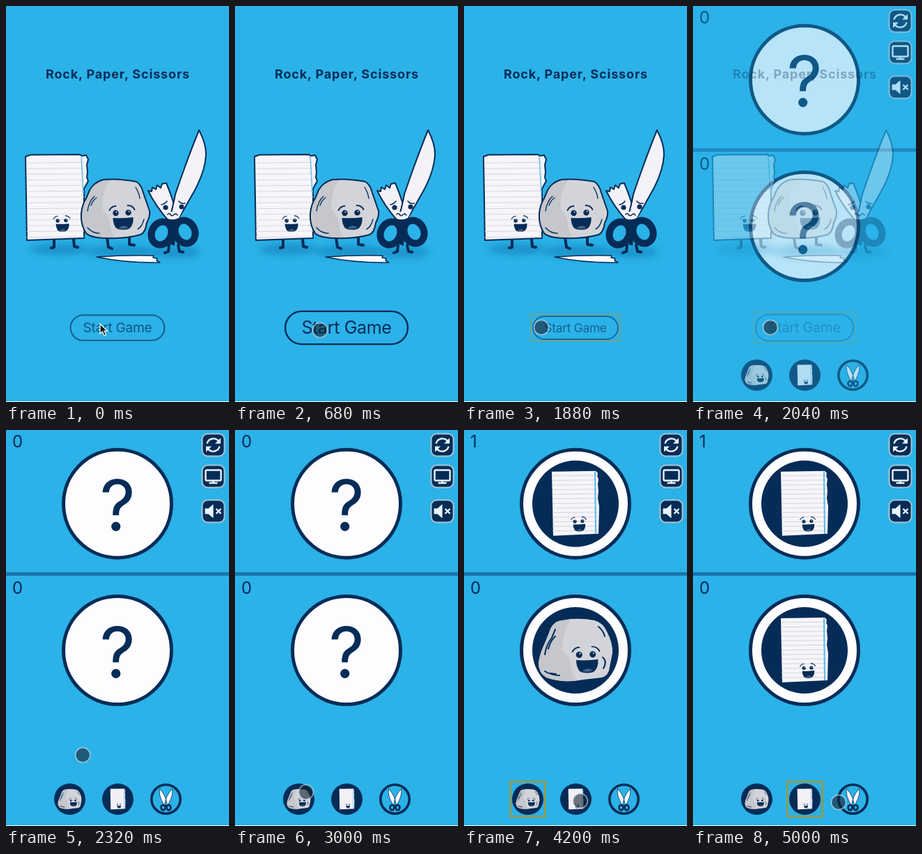
An HTML page that plays this animation: 320 by 568 pixels, repeating every 5.04 s.

```html
<!DOCTYPE html>
<html lang="en">
<head>
<meta charset="utf-8">
<title>Rock, Paper, Scissors</title>
<style>
html, body { margin: 0; width: 100%; height: 100%; overflow: hidden; background: #2bb2e8; }
svg { display: block; width: 100%; height: 100%; cursor: default; }
text { font-family: Inter, "Open Sans", sans-serif; fill: #052c57; }
.line { fill: none; stroke: #052c57; stroke-linecap: round; stroke-linejoin: round; }
.ink { fill: #052c57; }
.icon { fill: none; stroke: #e9f3f9; stroke-width: 2.4; stroke-linejoin: round; }
</style>
</head>
<body>
<svg viewBox="0 0 320 568">
  <defs>
    <filter id="soft" x="-20%" y="-100%" width="140%" height="300%"><feGaussianBlur stdDeviation="5"/></filter>

    <g id="face">
      <circle class="ink" cx="-9" r="4.2"/><circle class="ink" cx="9" cy="-.6" r="4.2"/>
      <circle cx="-8" cy="-1.6" r=".9" fill="#fff"/><circle cx="10" cy="-2.2" r=".9" fill="#fff"/>
      <path class="line" stroke-width="1.8" d="M-18-4Q-15-10-9-10M8-11Q15-11 18-5"/>
      <path class="ink" d="M-13 7Q2 8 16 6Q17 15 12 21Q9 24 2 24Q-6 24-9 21Q-13 15-13 7Z"/>
      <path d="M-5 21Q3 16 9 20.5Q6 22.5 2 22.5Q-3 22.5-5 21Z" fill="#45628a"/>
    </g>

    <g id="rock">
      <path fill="#d3d4da" d="M-53 18Q-51 4-45-8L-38-25Q-34-39-24-42L-6-45Q12-46 27-43Q39-40 45-27Q54-10 53 4L49 24Q48 36 38 39L12 42Q-18 48-42 39Q-53 33-53 18Z"/>
      <path fill="#c5c7cc" d="M-6-45Q-20-24-19 0Q-8 8-6 26Q-4 38 2 43Q-22 46-42 39Q-53 33-53 18Q-51 4-45-8L-38-25Q-34-39-24-42Z"/>
      <path class="line" stroke-width="2" d="M-44 6Q-42-8-34-18L-29-30M-39-2Q-36-14-29-20M39 10Q46 16 40 26M-44 30Q-34 36-23 36M33-34Q40-28 42-20M-36 33L-28 34"/>
      <use href="#face" transform="translate(15 6.5) scale(1.08)"/>
    </g>

    <g id="page">
      <path fill="#f7f5f9" d="M-34-46L29-47L32-44L31-40L33-35L32-28L33-18L32-8L34 4L33 43L-32 46Z"/>
      <path id="rules" fill="none" stroke="#d3d4de" stroke-width="1"/>
      <path fill="none" stroke="#58b9e6" stroke-width="2" d="M28-46L29 43"/>
      <use href="#face" transform="translate(4.5 25.5) scale(.6)"/>
    </g>

    <circle id="mark" r="77.5" fill="#fdfcff" stroke="#052c57" stroke-width="5"/>
    <g id="ask"><text y="38.5" font-size="100" text-anchor="middle">?</text></g>
    <g id="bigRock"><circle class="ink" r="62"/><use href="#rock"/></g>
    <g id="bigPage"><circle class="ink" r="62"/><use href="#page"/></g>
    <rect id="tile" x="-16" y="-16" width="32" height="32" rx="8" fill="#052c57" stroke="#a9c3d3" stroke-width="2"/>
    <path id="stone" d="M108 298Q109 285 115 276L120 264Q127 252 140 249Q162 247 187 252Q194 256 197 268L206 294Q207 301 202 311Q200 325 193 328Q172 334 145 333Q123 333 115 326Q107 314 108 298Z"/>
  </defs>

  <rect width="320" height="568" fill="#2bb2e8"/>

  <g id="game">
    <rect y="204" width="320" height="5" fill="#1a75ad"/>
    <text id="topScore" x="9" y="24.5" font-size="24">0</text>
    <text x="9" y="235" font-size="24">0</text>
    <g transform="translate(160 105.7)"><use href="#mark"/><use id="top"/></g>
    <g transform="translate(160 316)"><use href="#mark"/><use id="low"/></g>

    <g transform="translate(297.5 21.5)">
      <use href="#tile"/>
      <path class="icon" d="M-9-2A9.5 9.5 0 0 1 8-5M9 2A9.5 9.5 0 0 1-8 5"/>
      <path fill="#e9f3f9" d="M10.5-10V-2H2.5ZM-10.5 10V2H-2.5Z"/>
    </g>
    <g transform="translate(297.5 66.5)">
      <use href="#tile"/>
      <rect class="icon" x="-11" y="-9" width="22" height="15" rx="1.5"/>
      <path class="icon" d="M0 6V9M-6 9.5H6"/>
    </g>
    <g transform="translate(297.5 116.5)">
      <use href="#tile"/>
      <path fill="#e9f3f9" d="M-12-4H-7L0-10V10L-7 4H-12Z"/>
      <path class="icon" d="M4-3.5L11 3.5M11-3.5L4 3.5"/>
    </g>

    <g transform="translate(91.5 529.5)"><circle class="ink" r="22.5"/><use href="#rock" transform="scale(.32)"/></g>
    <g transform="translate(160.5 529.5)"><circle class="ink" r="22.5"/><use href="#page" transform="scale(.32)"/></g>
    <g transform="translate(229.5 529.5)">
      <circle r="20.7" fill="#2bb2e8" stroke="#052c57" stroke-width="3.6"/>
      <path fill="#fbfaff" stroke="#052c57" stroke-width=".8" d="M-9-15Q-11-6-3 8L2 10Q1-4-9-15ZM9-15Q11-6 3 8L-2 10Q-1-4 9-15Z"/>
      <ellipse class="line" stroke-width="2.6" cx="-4" cy="12" rx="3" ry="3.6"/>
      <ellipse class="line" stroke-width="2.6" cx="4" cy="12" rx="3" ry="3.6"/>
    </g>
    <rect id="focus" y="504.5" width="50" height="50" fill="none" stroke="#8f9a55" stroke-width="3"/>
  </g>

  <g id="menu">
    <text x="160.5" y="103.7" font-size="18" font-weight="700" letter-spacing=".85" text-anchor="middle">Rock, Paper, Scissors</text>
    <g fill="#1789c2" filter="url(#soft)" opacity=".75">
      <ellipse cx="76" cy="349" rx="42" ry="8"/>
      <ellipse cx="165" cy="352" rx="52" ry="9"/>
      <ellipse cx="243" cy="353" rx="36" ry="8"/>
    </g>
    <path class="line" stroke-width="4" d="M69 336V346L65 347M97 334L98 345L103 346M145 332L147 346L152 348M177 330V342L184 343M234 343L233 352L228 354M247 343L249 352L254 353"/>

    <path fill="#f6f5fa" stroke="#052c57" stroke-width="2" stroke-linejoin="round" d="M28 216L35 213.5L106 213L109 215L115 214L118 220L116 228L117 238L116 246L118 251L112 262V333L30 336Z"/>
    <path id="menuRules" fill="none" stroke="#dad9e3" stroke-width="1.1"/>
    <path fill="none" stroke="#6dc0e6" stroke-width="1.6" d="M108 215L111 270"/>
    <use href="#face" transform="translate(80 308) scale(.65)"/>

    <use href="#stone" fill="#d3d4da"/>
    <path fill="#c5c7cc" d="M150 248Q136 268 139 292Q150 304 150 318Q152 328 158 333Q123 334 115 326Q107 314 108 298Q109 285 115 276L120 264Q127 252 140 249Z"/>
    <use href="#stone" class="line" stroke-width="2"/>
    <path class="line" stroke-width="1.4" d="M117 294Q119 280 127 273M122 286Q125 278 130 275M117 318Q124 326 134 326M186 260Q191 268 192 276M198 306Q195 317 189 320"/>
    <use href="#face" transform="translate(166.5 297)"/>

    <path fill="#faf9fd" stroke="#052c57" stroke-width="1.5" stroke-linejoin="round" d="M130 360Q170 357 212 358L211 361L217 362L216 365L221 368Q174 369 130 360Z"/>

    <g fill="#f4f2f8" stroke="#052c57" stroke-width="2" stroke-linejoin="round">
      <path d="M204 265L209 266L210 260L215 263L217 257L222 261L224 255L230 254Q236 268 241 284L246 307L234 309Q214 286 204 265Z"/>
      <path d="M277 178Q287 197 287 213Q286 236 271 264Q261 282 246 308L234 308Q240 286 243 270Q261 217 277 178Z"/>
    </g>
    <g fill="none" stroke="#052c57" stroke-width="10">
      <ellipse cx="223" cy="326" rx="14" ry="17" transform="rotate(24 223 326)"/>
      <ellipse cx="257" cy="324" rx="14" ry="17" transform="rotate(-24 257 324)"/>
    </g>
    <path class="ink" d="M230 304L249 303L244 324L242 344L236 342L236 324Z"/>
    <path fill="#f4f2f8" d="M227 296L253 294L248 304Q240 308 232 305Z"/>
    <circle class="ink" cx="229" cy="289" r="3.6"/><circle class="ink" cx="252" cy="288" r="3.6"/>
    <path class="line" stroke-width="1.6" d="M223 285Q228 284 231 280M248 280Q251 284 257 283M232 299Q234 296 236 299T240 300T244 298L246 300"/>

    <g id="start">
      <rect id="ring" x="-92" y="-28" width="184" height="56" fill="none" stroke="#c0922a" stroke-width="2.2"/>
      <rect class="line" x="-88.2" y="-23.7" width="176.4" height="47.4" rx="23.7" stroke-width="2.4"/>
      <text y="8.7" font-size="25.2" letter-spacing="-.4" text-anchor="middle">Start Game</text>
    </g>
  </g>

  <rect y="567" width="320" height="1" fill="#fff"/>

  <g id="pointer">
    <path id="arrow" d="M0 0V14L3.4 11L6 17L8.6 15.8L6 10.2H10.4Z" fill="#111" stroke="#fff" stroke-width="1.2"/>
    <circle id="touch" r="10.5" fill="#14222e" fill-opacity=".6" stroke="#dfe8ee" stroke-opacity=".6" stroke-width="1.6"/>
  </g>
</svg>
<script>
const LOOP = 5040, PULSE = 2000, LOW = 1805;
const TOUCH = 320, START = 1800, ROCK = 3100, PAGE = 4400;
const FADE = [1900, 2110];
const path = [
  [0, 135, 456], [300, 132, 460], [680, 122, 465], [1300, 113, 462], [1700, 111, 461],
  [2200, 111, 461], [2850, 102, 519], [3500, 102, 521], [4150, 167, 532], [4450, 165, 532], [5000, 209, 534]
];

const $ = id => document.getElementById(id);
const set = (id, attrs) => { for (const k in attrs) $(id).setAttribute(k, attrs[k]); };
const show = (id, on) => set(id, { visibility: on ? 'visible' : 'hidden' });
const clamp = x => Math.min(1, Math.max(0, x));
const mix = (a, b, k) => a + (b - a) * k;

// cubic-bezier(.25, .1, .25, 1)
function ease(x) {
  let lo = 0, hi = 1, u = .5;
  for (let i = 0; i < 20; i++) {
    u = (lo + hi) / 2;
    const bx = .75 * u * (1 - u) + u ** 3;
    if (bx < x) lo = u; else hi = u;
  }
  return .3 * u * (1 - u) ** 2 + 3 * u * u * (1 - u) + u ** 3;
}

function pulse(t) {
  const p = ((t - LOW + PULSE) % PULSE) / PULSE * 2;
  return p < 1 ? ease(p) : 1 - ease(p - 1);
}

function place(t) {
  let i = 1;
  while (i < path.length - 1 && path[i][0] < t) i++;
  const [t0, x0, y0] = path[i - 1], [t1, x1, y1] = path[i];
  const k = clamp((t - t0) / (t1 - t0)), s = k * k * (3 - 2 * k);
  return [mix(x0, x1, s), mix(y0, y1, s)];
}

function rules(id, x0, x1, y0, y1, step) {
  let d = '';
  for (let y = y0; y < y1; y += step) d += `M${x0} ${y}L${x1} ${y - .6}`;
  set(id, { d });
}

function draw(t) {
  const k = pulse(t), fade = clamp((t - FADE[0]) / (FADE[1] - FADE[0]));
  set('start', { transform: `translate(160 461.5) scale(${mix(.67, 1, k)})`, opacity: mix(.56, 1, k) });
  show('ring', t >= START);
  set('menu', { opacity: 1 - fade, display: fade < 1 ? 'inline' : 'none' });
  set('game', { opacity: fade, display: fade > 0 ? 'inline' : 'none' });

  const played = t >= ROCK, again = t >= PAGE;
  set('top', { href: played ? '#bigPage' : '#ask' });
  set('low', { href: again ? '#bigPage' : played ? '#bigRock' : '#ask' });
  $('topScore').textContent = played ? '1' : '0';
  set('focus', { x: again ? 135.5 : 66.5, display: played ? 'inline' : 'none' });

  set('pointer', { transform: `translate(${place(t)})` });
  show('arrow', t < TOUCH);
  show('touch', t >= TOUCH);
}

rules('rules', -33, 32, -40, 45, 6.6);
rules('menuRules', 30, 112, 225, 334, 8.2);

function tick() {
  draw(performance.now() % LOOP);
  requestAnimationFrame(tick);
}
tick();
</script>
</body>
</html>
```
